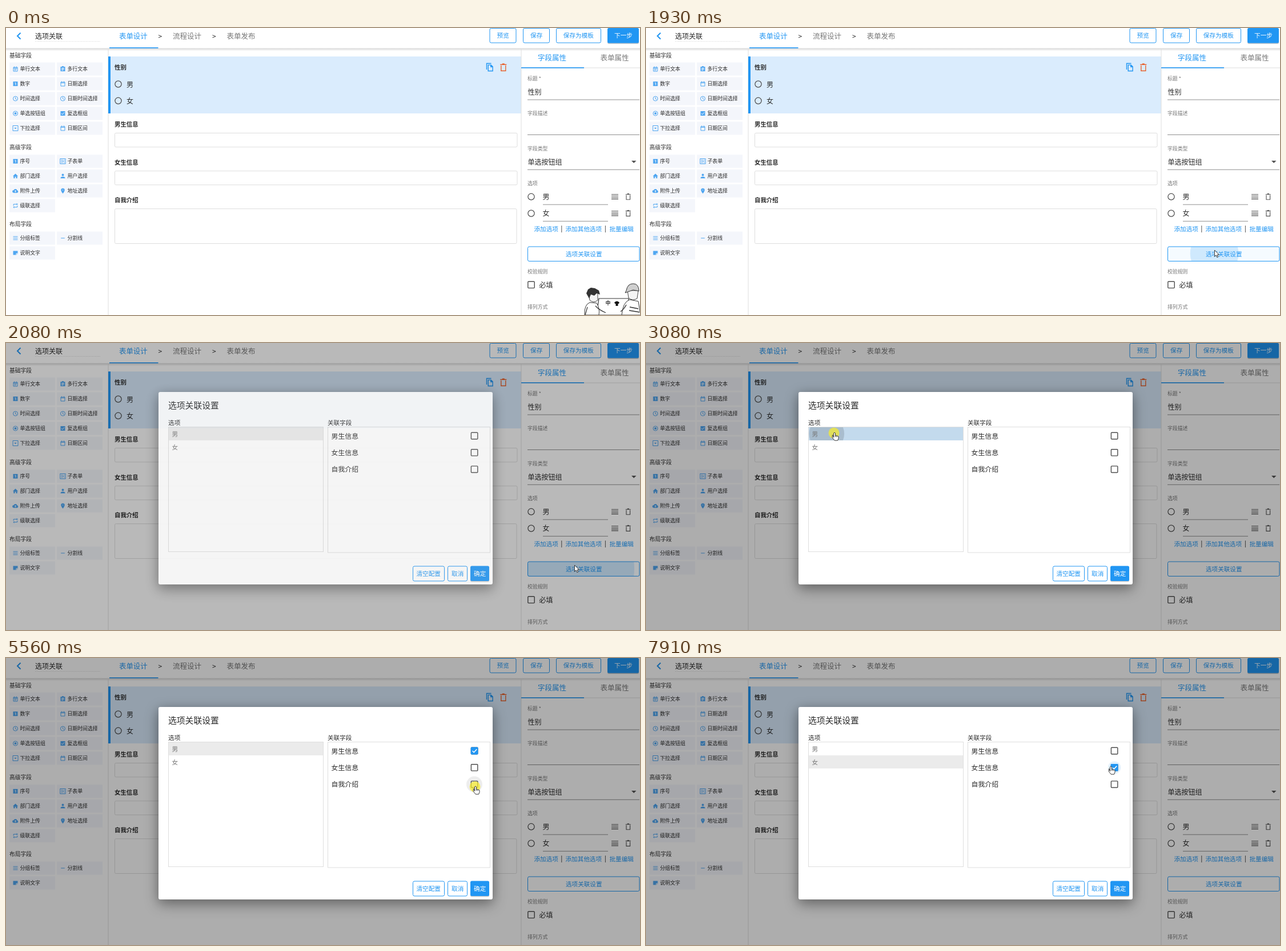
An HTML page that plays this animation: 1110 px wide and 504 px high, repeating every 7990 ms.

```html
<!DOCTYPE html>
<html lang="zh-CN">
<head>
<meta charset="utf-8">
<style>
html, body { margin: 0; width: 100%; height: 100%; overflow: hidden; background: #fff; }
svg { display: block; width: 1110px; height: 504px; font-family: "Noto Sans CJK SC", "Noto Sans CJK", "Noto Sans CJK JP", "Noto Sans", sans-serif; }
.panel { filter: drop-shadow(0 8px 12px rgba(0,0,0,.34)) drop-shadow(0 2px 8px rgba(0,0,0,.14)); }
#dialog { transform-origin: 559.5px 255px; }
</style>
</head>
<body>
<svg viewBox="0 0 1110 504">
  <defs>
    <linearGradient id="shade" x2="0" y2="1">
      <stop stop-color="#000" stop-opacity=".16"/><stop offset="1" stop-color="#000" stop-opacity="0"/>
    </linearGradient>
    <clipPath id="btnClip"><rect x="913" y="384" width="196" height="26" rx="2"/></clipPath>
    <clipPath id="rowClip0"><rect x="285" y="148" width="270" height="23"/></clipPath>
    <clipPath id="rowClip1"><rect x="285" y="171" width="270" height="23"/></clipPath>
  </defs>
  <g id="page"></g>
  <g id="figures"></g>
  <rect id="scrim" width="1110" height="504" opacity="0"/>
  <g id="dialog" opacity="0"></g>
  <circle id="press" r="9.5" fill="#f7ec2e" opacity=".72"/>
  <g id="cursor" fill="#fff" stroke="#222" stroke-linejoin="round">
    <path id="arrow" d="M.5 0V11.2L3 8.9 4.8 12.8 6.6 12 4.9 8.3H8.4Z" stroke-width=".9"/>
    <path id="hand" d="M-1.4 1.2Q0-.8 1.4 1.2V5.6Q3 4.8 3.8 6Q5.2 5.5 5.6 6.7Q7 6.6 7 8V10.6L5.6 14.2H.2L-3.8 9.2Q-4-.4 -1.4 9ZM1.4 5.6V8M3.8 6V8.3" stroke-width=".9"/>
  </g>
</svg>
<script>
const LOOP = 7990;
const BLUE = '#2196f3', INK = '#2b2b2b', GREY = '#767676', LINE = '#dedede';
const $ = id => document.getElementById(id);

const rect = (x, y, w, h, fill, stroke = 'none', r = 0, sw = 1) =>
  `<rect x="${x}" y="${y}" width="${w}" height="${h}" rx="${r}" fill="${fill}" stroke="${stroke}" stroke-width="${sw}"/>`;
const path = (d, stroke, sw = 1, fill = 'none') =>
  `<path d="${d}" stroke="${stroke}" stroke-width="${sw}" fill="${fill}"/>`;
const circle = (x, y, r, fill, stroke = 'none', sw = 1) =>
  `<circle cx="${x}" cy="${y}" r="${r}" fill="${fill}" stroke="${stroke}" stroke-width="${sw}"/>`;
// text is placed by its left edge and its vertical middle
const text = (x, cy, size, str, fill = INK, weight = 400) =>
  `<text x="${x}" y="${(cy + size * .38).toFixed(2)}" font-size="${size}" fill="${fill}" font-weight="${weight}">${str}</text>`;
const at = (x, y, body) => `<g transform="translate(${x} ${y})">${body}</g>`;
const outlined = (x, y, w, h, tx, str) =>
  rect(x, y, w, h, '#fff', BLUE, 2.5) + text(tx, y + h / 2, 10.65, str, BLUE);
const filled = (x, y, w, h, tx, str) =>
  rect(x, y + 1.5, w, h, '#000" opacity=".2', 'none', 2.5) +
  rect(x, y, w, h, BLUE, 'none', 2.5) + text(tx, y + h / 2, 10.65, str, '#fff');
const trash = (x, y, color, k) =>
  `<g transform="translate(${x} ${y}) scale(${k})">` +
  path('M-4-3.5V6H4V-3.5M-5.5-5H5.5M-2-6.3H2', color, 1.4) + '</g>';
const radio = (x, y) => circle(x, y, 5.6, '#fff" fill-opacity="0', '#4c4c4c', 1.25);

// each icon: filled shape, blue strokes, white strokes
const square = 'M-4-4H4V4H-4Z', cal = 'M-3.5-3H3.5V4H-3.5ZM-3.5-1.6H3.5M-2-4.4V-3M2-4.4V-3';
const ring = 'M-4 0A4 4 0 1 1 4 0A4 4 0 1 1-4 0Z';
const icons = {
  line: ['', cal + 'M-2 .2H2M-2 2H1', ''],
  area: [square, 'M-1.5-4.5H1.5', 'M-2.2-1.6H2.2M-2.2.2H2.2M-2.2 2H1'],
  num: [square, '', 'M-1-1.8H.4V2.4'],
  cal: ['', cal, ''],
  clock: ['', ring + 'M0-2.5V.3L2 1.6', ''],
  radio: ['M-2 0A2 2 0 1 1 2 0A2 2 0 1 1-2 0Z', ring, ''],
  check: [square, '', 'M-2.4 0L-.7 1.8 2.6-1.8'],
  drop: ['M-2.2-1H2.2L0 1.6Z', 'M-4.5-4.5H4.5V4.5H-4.5Z', ''],
  form: ['', 'M-4.7-4.5H4.7V4.5H-4.7ZM-3-2.2H0M-3 0H3M-3 2.2H0M1.5-2.2H3.2M1.5 2.2H3.2', ''],
  home: ['M0-4.2L4.6.2H3.2V4H1V1.2H-1V4H-3.2V.2H-4.6Z', '', ''],
  user: ['M-2-2A2 2 0 1 1 2-2A2 2 0 1 1-2-2ZM-4 4Q-4 1 0 1T4 4Z', '', ''],
  cloud: ['M-3 3.5A2.4 2.4 0 0 1-3-1.3A3.2 3.2 0 0 1 3-1A2.3 2.3 0 0 1 3 3.5Z', '', 'M0 2.4V-.6M-1.4.6L0-.8 1.4.6'],
  pin: ['M0 4.8Q-3.2 1-3.2-1.4A3.2 3.2 0 0 1 3.2-1.4Q3.2 1 0 4.8Z', '', 'M-.6-1.4H.6'],
  loop: ['', 'M-3.3 0V-2.6H3.5M2-4.2L3.6-2.6 2-1M3.3 0V2.6H-3.5M-2 4.2L-3.6 2.6-2 1', ''],
  rows: ['', 'M-4-2.8H4M-4 0H4M-4 2.8H4', ''],
  dash: ['', 'M-3.3 0H3.3', ''],
  note: ['M-4-3.5H4V1L1.6 3.5H-4Z', '', 'M4 1H1.5V3.5']
};
const icon = (x, y, name) => {
  const [solid, stroke, white] = icons[name], c = '#4fa6f1';
  return at(x, y, path(solid, 'none', 0, c) + path(stroke, c, 1) + path(white, '#fff', 1));
};

function sidebar() {
  const groups = [
    ['基础字段', 48, 72, 'line单行文本 area多行文本 num数字 cal日期选择 clock时间选择 clock日期时间选择 radio单选按钮组 check复选框组 drop下拉选择 cal日期区间'],
    ['高级字段', 209, 234, 'num序号 form子表单 home部门选择 user用户选择 cloud附件上传 pin地址选择 loop级联选择'],
    ['布局字段', 344, 369, 'rows分组标签 dash分割线 note说明文字']
  ];
  return groups.map(([title, ty, y0, list]) => text(6, ty, 9.75, title) +
    list.split(' ').map((item, i) => {
      const [, name, label] = item.match(/^([a-z]+)(.+)$/);
      const x = i % 2 * 83, y = y0 + (i >> 1) * 26;
      return rect(6 + x, y - 11.5, 80, 23, '#f4f6fb') + icon(16.5 + x, y, name) + text(24.5 + x, y, 8.9, label);
    }).join('')).join('') + rect(178.5, 36, 1, 468, LINE);
}

function header() {
  return path('M25.5 8.5L20 14 25.5 19.5', BLUE, 2) + text(51, 14, 12, '选项关联') +
    path('M51 23.5H166', '#d5d5d5', '1" stroke-dasharray="1 1.5') +
    text(198, 14, 12.4, '表单设计', BLUE) + text(266.5, 14, 12, '&gt;') +
    text(292, 14, 12.5, '流程设计', GREY) + text(361, 14, 12, '&gt;') + text(386.5, 14, 12.5, '表单发布', GREY) +
    rect(0, 35.5, 1110, 5, 'url(#shade)') + rect(181, 34, 85.5, 1.6, BLUE) +
    outlined(847, .5, 46, 25.5, 859.5, '预览') + outlined(905.5, .5, 46, 25.5, 918, '保存') +
    outlined(963.5, .5, 78, 25.5, 975.8, '保存为模板') + filled(1053, 0, 55, 26.5, 1065, '下一步');
}

function form() {
  const copy = 'M-5 4.5V-6.3H3M-2.3-3.6H2.6L5.6-.6V7H-2.3ZM2.3-3.4V-.3H5.4';
  return rect(179, 50, 723, 100, '#daecfd') + rect(179, 50, 4, 100, BLUE) +
    text(190, 69.5, 10.4, '性别', INK, 700) +
    radio(196.5, 98.5) + text(211, 99, 12, '男') + radio(196.5, 127.8) + text(211, 128.3, 12, '女') +
    at(846.5, 68.5, path(copy, BLUE, 1.4)) + trash(870.8, 69.2, '#e7622e', 1) +
    ['男生信息', '女生信息', '自我介绍'].map((s, i) =>
      text(190, 169.5 + i * 66.5, 10.4, s, INK, 700) +
      (i < 2 ? rect(190.5, 184.5 + i * 66.5, 704.5, 24.5, '#fff', LINE, 2)
             : rect(190.5, 317.5, 703.5, 61, '#fff', LINE, 2))).join('');
}

function properties() {
  const label = (y, s) => text(913, y, 8.9, s, GREY);
  const rule = (x, y, w) => rect(x, y, w, 1, '#8f8f8f');
  const option = (y, s) => radio(919.5, y) + text(939.5, y, 12, s) + rule(940, y + 13.3, 114) +
    path(`M1060 ${y - 4}h12m-12 2.7h12m-12 2.7h12m-12 2.7h12`, '#555', 1.1) + trash(1089.3, y, '#555', .82);
  return rect(901.5, 36, 1, 468, LINE) + rect(902, 69.5, 208, 1, LINE) + rect(902, 69, 110, 1.6, BLUE) +
    text(931, 52, 12.5, '字段属性', BLUE) + text(1040.5, 52, 12.5, '表单属性', GREY) +
    label(88.5, '标题 *') + text(913.5, 112.5, 12, '性别') + rule(913, 125.5, 196) +
    label(150, '字段描述') + rule(913, 187, 196) +
    label(211.5, '字段类型') + text(913.5, 235.3, 12, '单选按钮组') + rule(913, 248.3, 196) +
    path('M1095 233H1103.5L1099.2 237.3Z', 'none', 0, '#555') +
    label(273, '选项') + option(296.3, '男') + option(325.5, '女') +
    text(924.5, 353, 10.6, '添加选项', BLUE) + text(979.5, 353, 10.6, '添加其他选项', BLUE) +
    text(1056.5, 353, 10.6, '批量编辑', BLUE) + path('M972.8 347V359M1049.4 347V359', '#555') +
    rect(913.5, 384, 195.5, 25.5, '#fff', BLUE, 2.5) +
    `<g clip-path="url(#btnClip)">${rect(913, 384, 196, 26, BLUE + '" id="btnHover')}${circle(0, 396, 0, BLUE + '" id="btnRipple')}</g>` +
    text(980, 397, 10.6, '选项关联设置', BLUE) +
    label(428, '校验规则') + rect(913.8, 445.2, 11.4, 11.4, '#fff', '#4c4c4c', 1, 1.4) + text(933.5, 451.3, 12, '必填') +
    label(489.5, '排列方式');
}

// two plain seated figures holding a small panel
function figures() {
  const k = '#333';
  return path('M1038 475H1090V504H1034Z', k, 1.2, '#fff') +
    path('M1013 504Q1012 486 1022 482L1034 483Q1040 492 1038 504Z', k, 1, '#fff') +
    path('M1020 466L1036 465 1036 478Q1029 484 1022 478Z', k, .9, '#f4f4f4') +
    path('M1016 466L1019 459 1024 456 1031 457 1038 461 1040 468 1034 466 1030 470 1024 468 1021 475Z', 'none', 0, k) +
    path('M1032 488Q1038 495 1050 500M1018 490L1014 504', k, 1.2) +
    path('M1078 504Q1080 481 1092 477L1107 480 1111 504Z', k, 1, '#fff') +
    path('M1088 461H1107L1105 475Q1097 480 1090 474Z', k, .9, '#f4f4f4') +
    path('M1086 461Q1088 449 1098 449T1108 462L1098 460 1084 465Z', k, 1, '#cfcfcf') +
    path('M1086 486Q1082 494 1076 498M1092 490L1107 493M1091 496L1109 499', k, 1.4) +
    text(1049.5, 483, 9, '中', k, 700) +
    path('M1065 482L1068 480H1071L1074 482 1072.5 484.5 1071.5 484V488H1067.5V484L1066.5 484.5Z', 'none', 0, '#111');
}

const boxY = [163, 192.4, 221.8], rowY = [148, 171];

function dialog() {
  const out = [rect(267, 86, 585, 338, '#fff" class="panel', 'none', 3),
    text(284, 109.5, 14.8, '选项关联设置'), text(284, 140, 10.7, '选项'), text(563, 140, 10.6, '关联字段'),
    rect(284.5, 147.5, 271, 219, '#fff', LINE), rect(563.5, 147.5, 284, 220.5, '#fff', LINE)];
  rowY.forEach((y, i) => out.push(rect(285, y, 270, 23, `#fff" id="row${i}`),
    `<g clip-path="url(#rowClip${i})">${circle(0, y + 11.5, 0, `#000" id="ripple${i}`)}</g>`,
    text(290.5, y + 11.7, 10.6, '男女'[i], GREY)));
  boxY.forEach((y, i) => out.push(text(569.5, y, 11.9, ['男生信息', '女生信息', '自我介绍'][i]),
    circle(820, y, 14, `#000" id="halo${i}`), rect(814.4, y - 5.7, 11.4, 11.4, '#fff" fill-opacity="0', '#4c4c4c', 1, 1.4),
    `<g id="tick${i}">${rect(813.7, y - 6.4, 12.8, 12.8, BLUE, 'none', 1.4)}${path(`M816.6 ${y}l2.6 2.7 5-5.4`, '#fff', 1.5)}</g>`));
  out.push(outlined(712.5, 392, 55, 26, 718.4, '清空配置'), outlined(773.5, 392, 34, 26, 780, '取消'),
    filled(813, 391.5, 33, 26.5, 819, '确定'));
  return out.join('');
}

$('page').innerHTML = header() + sidebar() + form() + properties();
$('figures').innerHTML = figures();
$('dialog').innerHTML = dialog();

// time, x, y of the pointer tip
const route = [[70, 1030, 482], [500, 640, 300], [850, 235, 190], [1150, 245, 205], [1650, 995, 390], [2300, 995, 390],
  [2620, 800, 300], [3000, 330, 157], [3250, 330, 157], [3700, 621, 190], [4080, 785, 164], [4300, 819, 160],
  [4950, 819, 160], [5400, 822, 225], [5850, 822, 225], [6350, 395, 205], [6560, 316, 178], [6850, 316, 178],
  [7150, 690, 207], [7350, 788, 200], [7580, 814, 190], [LOOP, 814, 190]];
const handTimes = [[2920, 3350], [3620, 5960], [6470, 6930], [7050, LOOP]];
const pressTimes = [[1790, 1880], [3030, 3110], [4380, 4480], [5490, 5730], [6540, 6630], [7740, 7840]];
const haloTimes = [[4280, 5050], [7560, LOOP], [5360, 5930]];
const tickTimes = [[4480, 6620], [7850, LOOP], [5730, 6620]];
const focusTimes = [[3080, 4400], [6620, 7750]];

const clamp = v => Math.max(0, Math.min(1, v));
const within = (t, [a, b]) => t >= a && t < b;
const show = (id, on) => $(id).setAttribute('visibility', on ? 'inherit' : 'hidden');
const set = (id, attrs) => { for (const k in attrs) $(id).setAttribute(k, attrs[k]); };

function pointer(t) {
  const i = Math.max(1, route.findIndex(p => p[0] > t));
  const [a, b] = [route[i - 1], route[i]];
  const u = clamp((t - a[0]) / (b[0] - a[0])), e = u * u * (3 - 2 * u);
  return [a[1] + (b[1] - a[1]) * e, a[2] + (b[2] - a[2]) * e];
}

function draw(t) {
  const [x, y] = pointer(t), hand = handTimes.some(r => within(t, r));
  show('cursor', t >= 70);
  show('hand', hand);
  show('arrow', !hand);
  set('cursor', { transform: `translate(${x.toFixed(1)} ${y.toFixed(1)})` });
  show('press', pressTimes.some(r => within(t, r)));
  set('press', { cx: x - 1, cy: y + 1 });
  show('figures', t < 1800);

  const fade = 1 - clamp((t - 2150) / 150);
  set('btnHover', { opacity: t > 1630 ? .045 * fade : 0 });
  set('btnRipple', { cx: 991 + .067 * (t - 1870), r: Math.max(0, 21 + .35 * (t - 1870)), opacity: t > 1870 ? .18 * fade : 0 });

  const open = clamp((t - 2000) / 94), grow = 1 - clamp((t - 2000) / 72);
  set('scrim', { opacity: .32 * open });
  set('dialog', { opacity: open });
  $('dialog').style.transform = `scale(${1 - .2 * grow * grow})`;

  const picked = t < 6620 ? 0 : 1;
  focusTimes.forEach((span, i) => {
    const age = t - span[0], live = age >= 0 && age < 420;
    set('row' + i, { fill: within(t, span) ? '#c3daed' : picked === i ? '#ebebeb' : '#fff' });
    set('ripple' + i, { cx: 316 + .3 * age, r: Math.max(0, 30 + .8 * age), opacity: live ? .135 * (1 - clamp((age - 220) / 200)) : 0 });
  });
  tickTimes.forEach((span, i) => {
    const on = within(t, span);
    show('tick' + i, on);
    set('halo' + i, { fill: on ? BLUE : '#000', r: on ? 11 : 14, opacity: within(t, haloTimes[i]) ? (on ? .13 : .07) : 0 });
  });
}

function tick(now) {
  draw(now % LOOP);
  requestAnimationFrame(tick);
}
draw(0);
requestAnimationFrame(tick);
</script>
</body>
</html>
```
